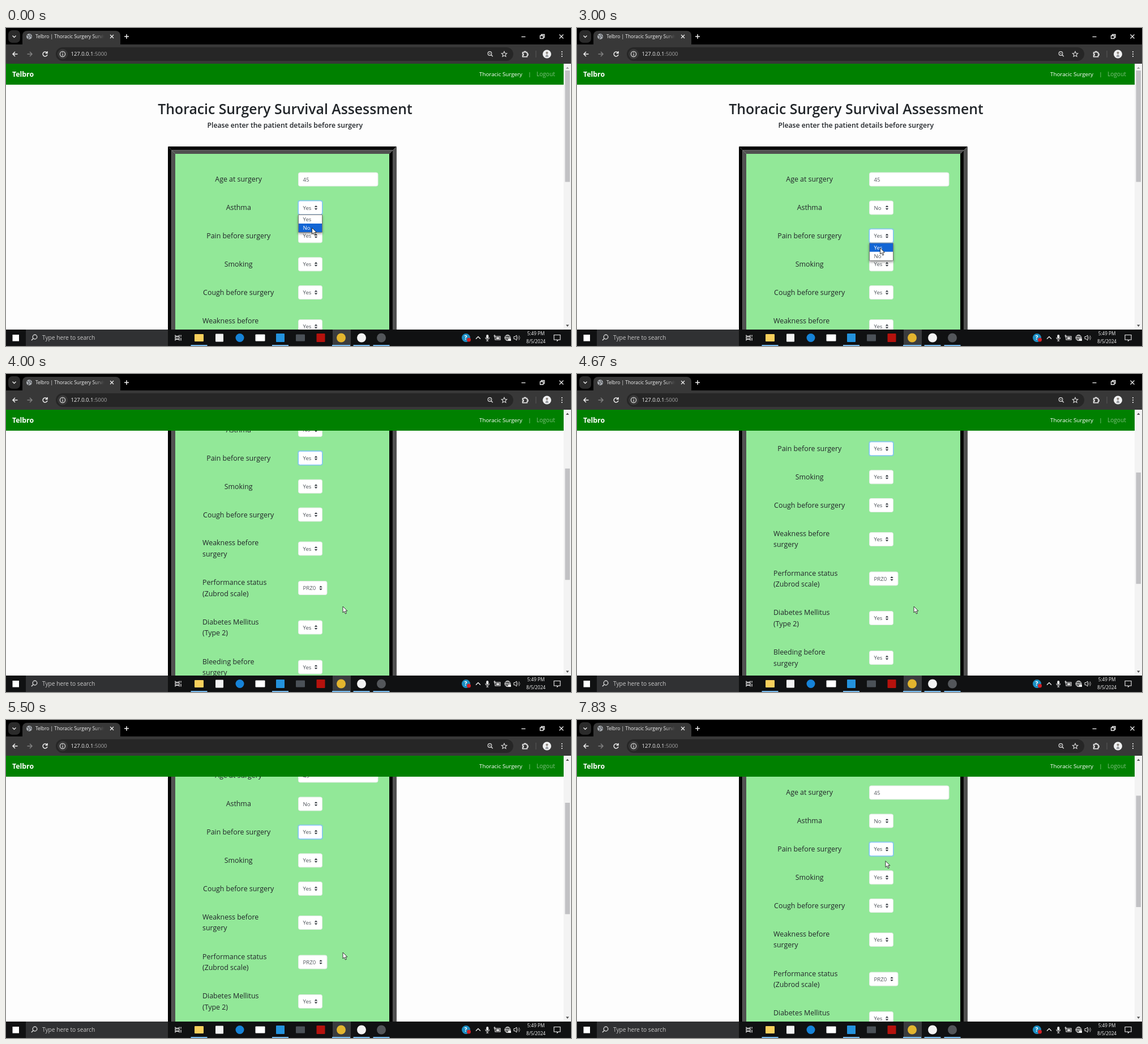
Recreate the animation shown at these times as an HTML page with a canvas. Size 998 by 561 pixels, loop 8000 ms.

```html
<!DOCTYPE html>
<html lang="en">
<head>
<meta charset="utf-8">
<title>Telbro | Thoracic Surgery Survival</title>
<style>
  html, body { margin: 0; width: 100%; height: 100%; overflow: hidden; background: #000; }
  canvas { display: block; width: 998px; height: 561px; }
</style>
</head>
<body>
<canvas id="stage" width="998" height="561"></canvas>
<script>
const g = document.getElementById('stage').getContext('2d');
const LOOP = 8000, FPS = 6;
const FONT = '"Open Sans", "Noto Sans", sans-serif';
const BRAND = 'Telbro';

// [time, x, y] of the pointer tip
const POINTER = [
  [0, 540.5, 352.5], [500, 540.5, 352.5], [1333, 581, 361], [1833, 581, 361], [2500, 541, 371],
  [2667, 541, 371], [3000, 535.5, 388], [3167, 535.5, 388], [3500, 595, 410],
  [6000, 595, 410], [6167, 574, 310], [6333, 515, 210], [6500, 480, 169.5],
  [6667, 496, 180], [7000, 550, 219], [7333, 550, 219], [7833, 542.5, 263.5]
];
// [time, offset]
const SCROLL = [[3333, 0], [4000, 218.5], [4333, 235], [5000, 235], [5500, 169], [6000, 139]];

// [label lines, first line y, field y, value, field width]
const ROWS = [
  ['Age at surgery', 267, 267, '45', 141],
  ['Asthma', 317, 317, 'Yes'],
  ['Pain before surgery', 366.8, 366.8, 'Yes'],
  ['Smoking', 417, 416.8, 'Yes'],
  ['Cough before surgery', 466.8, 466.5, 'Yes'],
  ['Weakness before/surgery', 516.5, 526.5, 'Yes'],
  ['Performance status/(Zubrod scale)', 586.5, 596, 'PRZ0', 51],
  ['Diabetes Mellitus/(Type 2)', 656, 665.5, 'Yes'],
  ['Bleeding before/surgery', 726, 735.5, 'Yes']
];

function at(keys, t) {
  const i = keys.findIndex(k => k[0] > t);
  if (i === 0) return keys[0].slice(1);
  if (i < 0) return keys[keys.length - 1].slice(1);
  const a = keys[i - 1], b = keys[i], p = (t - a[0]) / (b[0] - a[0]);
  return a.slice(1).map((v, n) => v + (b[n + 1] - v) * p);
}

function box(x, y, w, h, fill, r = 0, stroke) {
  g.beginPath();
  g.roundRect(x, y, w, h, r);
  if (fill) { g.fillStyle = fill; g.fill(); }
  if (stroke) { g.strokeStyle = stroke; g.lineWidth = 1; g.stroke(); }
}

function disc(x, y, r, fill, stroke, lw = 1) {
  g.beginPath();
  g.arc(x, y, r, 0, 7);
  if (fill) { g.fillStyle = fill; g.fill(); }
  if (stroke) { g.strokeStyle = stroke; g.lineWidth = lw; g.stroke(); }
}

function poly(pts, fill) {
  g.beginPath();
  for (let i = 0; i < pts.length; i += 2) g.lineTo(pts[i], pts[i + 1]);
  g.fillStyle = fill;
  g.fill();
}

function path(d, x, y, color = '#eee', lw = 1.3, fill) {
  g.save();
  g.translate(x, y);
  const p = new Path2D(d);
  if (fill) { g.fillStyle = fill; g.fill(p); }
  g.strokeStyle = color;
  g.lineWidth = lw;
  g.stroke(p);
  g.restore();
}

// y is the visual middle of the line
function text(s, x, y, size, color, align = 'left', weight = 400) {
  g.font = `${weight} ${size}px ${FONT}`;
  g.textAlign = align;
  g.fillStyle = color;
  g.fillText(s, x, y + size * 0.34);
}

function lens(x, y, r, dir, color) {
  disc(x, y, r, null, color, 1.2);
  const d = r * 0.7;
  path(`M${d * dir} ${d}l${r * 0.9 * dir} ${r * 0.9}`, x, y, color);
}

function browser() {
  box(0, 0, 998, 30, '#000');
  box(4, 4, 21, 22, '#2b2b2b', 7);
  path('M-3-1.5L0 1.5L3-1.5', 14.5, 15);
  box(29, 5, 173, 30, '#383838', [8, 8, 0, 0]);
  box(0, 29, 998, 34, '#383838');
  disc(41, 15, 5, '#a9adb2');
  path('M-4-2L-1-1L0 2L-2 4M1-4L2-1L4 1', 41, 15, '#4a4d50', 1.2);
  g.save();
  g.beginPath();
  g.rect(50, 6, 124, 20);
  g.clip();
  const fade = g.createLinearGradient(155, 0, 174, 0);
  fade.addColorStop(0, '#f2f2f2');
  fade.addColorStop(1, '#383838');
  text(BRAND + ' | Thoracic Surgery Survival', 52, 15, 8.4, fade);
  g.restore();
  path('M-3-3L3 3M3-3L-3 3', 187, 15);
  path('M-4 0H4M0-4V4', 213, 15, '#eee', 1.5);
  path('M-3.5 0H3.5', 914, 15.5);
  path('M-3.5-1.5H2V3.5H-3.5ZM-1.5-1.5V-3.5H4V1.5H2', 947, 15);
  path('M-3.5-3.5L3.5 3.5M3.5-3.5L-3.5 3.5', 981, 15);

  path('M4.5 0H-4M0-4L-4 0L0 4', 16, 46, '#eee', 1.5);
  path('M-4.5 0H4M0-4L4 0L0 4', 42, 46, '#808080', 1.5);
  path('M3.2-2.6A4 4 0 1 0 4 1M4-5V-1.5H.5', 69, 46, '#eee', 1.5);
  box(88, 34, 808, 24, '#262626', 12);
  disc(100, 46, 9, '#383838');
  disc(100, 46, 4.6, null, '#ddd', 1.2);
  path('M0-2.7V-1.4M0-.3V2.7', 100, 46, '#eee', 1.2);
  text('127.0.0.1', 114.5, 46, 9.45, '#f2f2f2');
  const w = g.measureText('127.0.0.1').width;
  text(':5000', 114.5 + w, 46, 9.45, '#a3a3a3');
  lens(854.5, 45, 3.3, 1, '#ddd');
  path('M-1.5 0H1.5', 854.5, 45, '#ddd', 1);
  g.beginPath();
  for (let i = 0; i < 10; i++) {
    const a = i * Math.PI / 5 - Math.PI / 2, r = i % 2 ? 2.3 : 5;
    g.lineTo(880 + r * Math.cos(a), 46.3 + r * Math.sin(a));
  }
  g.closePath();
  g.strokeStyle = '#ddd';
  g.lineWidth = 1.1;
  g.stroke();
  path('M-4.5-3H-1.5V-4.5H1V-3H3.5V-.5H5V2H3.5V4.8H-4.5V2.3H-3V-.2H-4.5Z', 917, 46, '#eee', 1.5);
  box(935.5, 40, 1, 12, '#585858');
  disc(955.5, 46, 7.5, '#f0f1f2');
  disc(955.5, 43.8, 2.1, '#8f8880');
  path('M-2.4 4Q-2.4 0 0 0Q2.4 0 2.4 4Z', 955.5, 47, '#9a9ea4', 0.5, '#9a9ea4');
  for (const dy of [-4, 0, 4]) disc(982, 46 + dy, 1.1, '#eee');
}

function navbar() {
  box(0, 63, 985, 37, '#008000');
  text(BRAND, 11, 82, 12.3, '#fff', 'left', 700);
  text('Thoracic Surgery', 836, 82, 9.8, '#fff', 'left', 500);
  text('|', 925, 81.5, 9.8, '#9fcf9f', 'center');
  text('Logout', 937, 82, 10.1, '#7fbf7f');
}

function scrollbar(s) {
  box(985, 63, 13, 469, '#f3f3f3');
  box(987.5, 75 + s * 0.42, 8.5, 196.5, '#c1c1c4');
  poly([989, 72, 994.5, 72, 991.75, 68.5], s ? '#505050' : '#a3a3a3');
  poly([989, 523.5, 994.5, 523.5, 991.75, 527], '#505050');
}

function panel() {
  const l = 286, r = 690, t = 209, b = 1200, d = 6.5;
  const ring = (k, tl, br) => {
    const L = l + k, R = r - k, T = t + k;
    poly([L, T, R, T, R - d, T + d, L + d, T + d], tl);
    poly([L, T, L + d, T + d, L + d, b, L, b], tl);
    poly([R, T, R, b, R - d, b, R - d, T + d], br);
  };
  box(l + 12, t + 12, r - l - 24, b - t, '#92e898');
  ring(0, '#060606', '#505050');
  ring(d, '#505050', '#060606');
}

function field(y, value, focus, w = 42.5) {
  if (focus) box(515, y - 13.5, w + 2.5, 27, 'rgba(120,190,255,.45)', 4);
  box(516.5, y - 12, w - 0.5, 24, '#fff', 3, focus ? '#80bdff' : '#dfeae2');
  text(value, 524.5, y + 0.3, 9.6, '#50565c');
  if (w > 100) return;
  const x = 516 + w - 11;
  poly([x - 2.7, y - 0.9, x + 2.7, y - 0.9, x, y - 4], '#343a40');
  poly([x - 2.7, y + 0.9, x + 2.7, y + 0.9, x, y + 4], '#343a40');
}

function menu(y, pick) {
  g.save();
  g.shadowColor = 'rgba(0,0,0,.4)';
  g.shadowBlur = 4;
  g.shadowOffsetY = 2;
  box(516, y + 12, 43, 32, '#fff');
  g.restore();
  box(516.5, y + 12.5, 42, 31, '#fff', 0, '#777');
  box(517, y + 13 + pick * 15, 41, 15, '#1265d4');
  ['Yes', 'No'].forEach((s, i) =>
    text(s, 524.5, y + 20.5 + i * 15, 9.6, i === pick ? '#fff' : '#50565c', 'left', i === pick ? 500 : 400));
}

function page(t, s) {
  const asthmaOpen = t < 490, painOpen = t > 2600 && t < 3150;
  g.save();
  g.beginPath();
  g.rect(0, 63, 985, 469);
  g.clip();
  box(0, 63, 985, 469, '#fdfdfd');
  g.translate(0, -s);
  text('Thoracic Surgery Survival Assessment', 493, 143.5, 24.8, '#212529', 'center', 600);
  text('Please enter the patient details before surgery', 492.7, 171.5, 12.27, '#212529', 'center', 600);
  panel();
  const focus = t < 2600 ? 1 : 2;
  ROWS.forEach(([label, y, fy, value, w], i) => {
    const lines = label.split('/');
    if (lines.length > 1) lines.forEach((line, n) => text(line, 347, y + n * 19.7, 12.4, '#212529'));
    else text(label, 410.7, y, 12.4, '#212529', 'center');
    field(fy, i === 1 && !asthmaOpen ? 'No' : value, i === focus, w);
  });
  if (asthmaOpen) menu(ROWS[1][2], 1);
  if (painOpen) menu(ROWS[2][2], 0);
  g.restore();
}

function taskbar() {
  box(0, 532, 998, 29, '#101112');
  box(35, 532, 251, 29, '#303133');
  box(577, 532, 32, 29, '#3a3c3e');
  box(11.5, 541, 11.5, 11.5, '#fff');
  lens(51, 545, 3.8, -1, '#eee');
  text('Type here to search', 64, 546.5, 10.2, '#c8c8c8');
  path('M-5-5V-3H2V-5M-5 5V3H2V5M-5-1.5H2V1.5H-5ZM5-5V-2M5 0V5', 304, 546.5, '#eee', 1.2);

  // app shortcuts
  const sq = (x, color, w = 14, h = w) => box(x - w / 2, 546.5 - h / 2, w, h, color, 1);
  sq(341, '#f8cf5c', 16, 13);
  sq(377, '#f2f2f2');
  disc(413, 546.5, 7.5, '#1683d8');
  sq(449, '#fff', 17, 12);
  sq(484.5, '#2492dc', 15);
  sq(520, '#4b5157', 16, 12);
  sq(556, '#b5120d', 15);
  disc(592, 546.5, 8, '#e3b52e');
  disc(628, 546.5, 8, '#f2f2f2');
  disc(663, 546.5, 8, '#53565a');
  for (const x of [341, 484.5, 592, 628, 663]) {
    const w = x === 592 ? 32 : 29;
    box(x - w / 2, 559, w, 2, '#76b9ed');
  }

  // tray
  disc(812.5, 546.5, 7.5, '#1b8fc4');
  text('?', 812, 546.5, 10.5, '#fff', 'center', 700);
  disc(817.5, 550, 3.5, '#d31f26');
  path('M-4 2L0-2L4 2', 834, 546.5);
  box(848.3, 541, 4, 7, '#eee', 2);
  path('M-3.5-.5Q-3.5 3 0 3Q3.5 3 3.5-.5M0 3V5.5M-2 5.5H2', 850.3, 546.5, '#eee', 1);
  path('M-4-3H5V3H-4Z', 868, 547, '#eee', 1.1);
  box(866, 545.5, 5.5, 3.2, '#eee');
  path('M-5-4V1M-6.5-2H-3.5', 868, 545, '#eee', 1);
  disc(886, 546.5, 5, null, '#eee');
  path('M-5 0H5M0-5V5M-1-5Q-5 0-1 5M1-5Q5 0 1 5', 886, 546.5, '#eee', 0.9);
  box(887, 548, 5, 4, '#eee');
  path('M-5-2H-3L0-4.5V4.5L-3 2H-5Z', 902, 546.5, '#eee', 1);
  path('M2-2Q3.5 0 2 2M4-4Q7 0 4 4', 902, 546.5, '#bbb', 1);
  text('5:49 PM', 936, 539.5, 8.2, '#f2f2f2', 'center');
  text('8/5/2024', 936, 553, 8.2, '#f2f2f2', 'center');
  path('M-5.5-5H5.5V3.5H2L0 5.5V3.5H-5.5Z', 973.5, 546.5, '#eee', 1.1);
}

function pointer([x, y]) {
  path('M0 0V11L2.6 8.6L4.4 13L6.3 12.2L4.5 8H8Z', x, y, '#222', 0.9, '#fff');
}

function draw(t) {
  const [s] = at(SCROLL, t);
  page(t, s);
  navbar();
  scrollbar(s);
  browser();
  taskbar();
  pointer(at(POINTER, t));
}

let start, last = -1;
function tick(now) {
  start ??= now;
  const step = Math.floor(((now - start) % LOOP + 1) * FPS / 1000) % (LOOP * FPS / 1000);
  if (step !== last) draw((last = step) * 1000 / FPS);
  requestAnimationFrame(tick);
}
draw(0);
requestAnimationFrame(tick);
</script>
</body>
</html>
```
